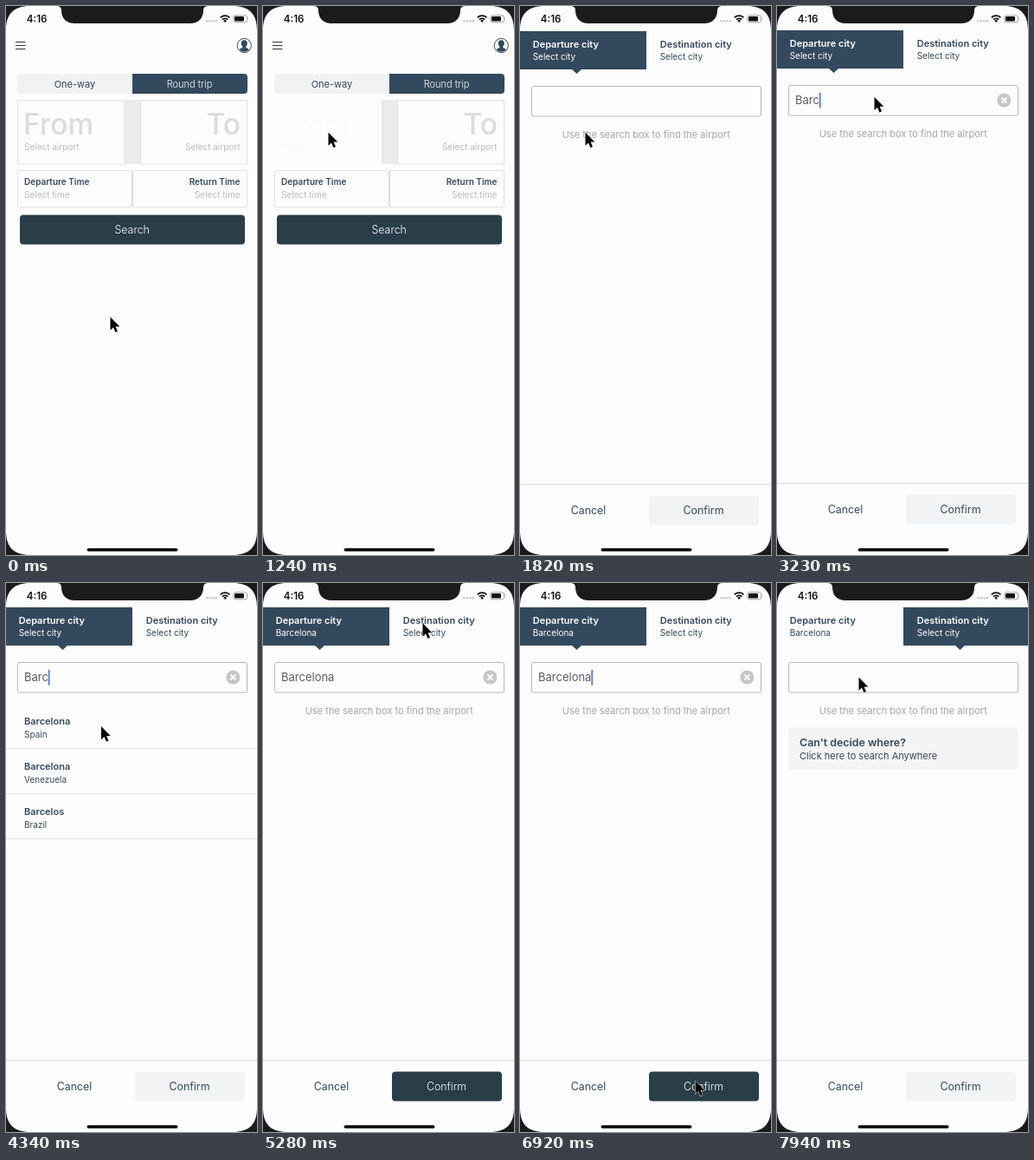
An HTML page for the animation above (8000 ms loop, 290x632 px).

```html
<!DOCTYPE html>
<html lang="en">
<head>
<meta charset="utf-8">
<title>Flight search</title>
<style>
html, body { margin: 0; width: 100%; height: 100%; overflow: hidden; background: #fdfdfd; }
svg { display: block; width: 100vw; height: 100vh; }
text { font-family: Inter, Roboto, sans-serif; font-size: 11px; fill: #34495e; white-space: pre; }
.s10 { font-size: 10px; }
.s12 { font-size: 12.4px; }
.s13 { font-size: 13px; }
.big { font-size: 33.5px; font-weight: 500; fill: #dcdcdc; }
.bold { font-weight: 600; }
.light { font-weight: 300; }
.pale { fill: #bdbdbd; }
.hint { fill: #a6a6a6; }
.white { fill: #fff; }
.end { text-anchor: end; }
.mid { text-anchor: middle; }
.box { fill: #fdfdfd; stroke: #e2e2e2; }
.navy { fill: #33495d; }
.dark { fill: #2a3e49; }
</style>
</head>
<body>
<svg viewBox="0 0 290 632" xmlns="http://www.w3.org/2000/svg">
  <rect width="290" height="632" fill="#fdfdfd"/>

  <g id="home">
    <path d="M11 41.5H22.5M11 45.5H22.5M11 49.5H22.5" stroke="#333" stroke-width="1.1"/>
    <circle cx="275.3" cy="45.5" r="8.1" fill="#fdfdfd" stroke="#33495d"/>
    <path class="navy" d="M275.3 39.3c2.4 0 3.6 1.7 3.5 3.9-.1 1.6-.8 2.7-1.5 3.4v1.4c1.4.6 2.9 1 3.5 2.2a7.3 7.3 0 0 1-11 0c.6-1.2 2.1-1.6 3.5-2.2v-1.4c-.7-.7-1.4-1.8-1.5-3.4-.1-2.2 1.1-3.9 3.5-3.9z"/>
    <path d="M17 78H146V101H17a4 4 0 0 1-4-4V82a4 4 0 0 1 4-4z" fill="#f0f2f3"/>
    <path class="navy" d="M146 78H275a4 4 0 0 1 4 4V97a4 4 0 0 1-4 4H146z"/>
    <text class="mid" x="79.5" y="93.7">One-way</text>
    <text class="mid white light" x="212" y="93.7">Round trip</text>
    <rect x="136" y="108" width="20" height="74" fill="#ebebeb"/>
    <rect x="136" y="109" width="1" height="73" fill="#fdfdfd" id="edge"/>
    <g id="from">
      <rect class="box" x="13.5" y="108.5" width="123" height="73.5"/>
      <rect x="136" y="108" width="2" height="74.5" fill="#ebebeb"/>
      <text class="big" x="20" y="148">From</text>
      <text class="s10 pale" x="21" y="166">Select airport</text>
    </g>
    <rect class="box" x="155.5" y="108.5" width="123" height="73.5"/>
    <text class="big end" x="271" y="148">To</text>
    <text class="s10 pale end" x="270.5" y="166">Select airport</text>
    <rect class="box" x="13.5" y="189.5" width="132" height="42" rx="1.5"/>
    <rect class="box" x="146.5" y="189.5" width="132" height="42" rx="1.5"/>
    <path d="M146 190V231" stroke="#d6d6d6"/>
    <text class="s10 bold" x="21" y="206">Departure Time</text>
    <text class="s10 pale" x="21" y="220.8">Select time</text>
    <text class="s10 bold end" x="270.5" y="206">Return Time</text>
    <text class="s10 pale end" x="270.5" y="220.8">Select time</text>
    <rect class="dark" x="16" y="240.5" width="260" height="34" rx="4"/>
    <text class="s12 mid white light" x="145.7" y="262.3">Search</text>
  </g>

  <g id="modal">
    <rect y="28" width="290" height="604" fill="#fdfdfd"/>
    <g id="tab" class="navy"><path d="M0 28H146V72H71L65.5 77L60 72H0z"/></g>
    <text id="depTitle" class="bold" x="14.7" y="46.7">Departure city</text>
    <text id="depCity" class="s10" x="14.7" y="61.2"></text>
    <text id="desTitle" class="bold" x="161.7" y="46.7">Destination city</text>
    <text id="desCity" class="s10" x="161.7" y="61.2">Select city</text>
    <rect x="13.5" y="91.5" width="265" height="34.5" rx="2" fill="#fdfdfd" stroke="#b8b8b8"/>
    <text id="query" class="s13" x="21" y="113.2" style="fill:#5c5c5c"></text>
    <rect id="caret" y="100" width="1.6" height="17.5" fill="#4a6ee0"/>
    <g id="clear">
      <circle cx="262.4" cy="108.5" r="8" fill="#c6c6c6"/>
      <path d="M259.4 105.5l6 6m0-6l-6 6" stroke="#fff" stroke-width="1.9"/>
    </g>
    <text id="hint" class="mid hint" x="145.8" y="151">Use the search box to find the airport</text>
    <g id="results"></g>
    <g id="card">
      <rect x="13" y="166" width="266" height="49" rx="5" fill="#f4f4f4"/>
      <text class="bold s12" x="26" y="188.4">Can't decide where?</text>
      <text x="26" y="203">Click here to search Anywhere</text>
    </g>
    <path d="M0 549.5H290" stroke="#dadada"/>
    <text class="s12 mid" x="79" y="584">Cancel</text>
    <g id="confirm">
      <rect id="button" x="149" y="562.5" width="127" height="34" rx="4"/>
      <text id="label" class="s12 mid" x="212" y="584">Confirm</text>
    </g>
  </g>

  <g id="device">
    <path fill="#1b1b1c" fill-rule="evenodd" d="M0 0H290V632H0z M28 0C9 0 0 9 0 28V604C0 623 9 632 28 632H262C281 632 290 623 290 604V28C290 9 281 0 262 0z"/>
    <path fill="#1b1b1c" d="M58 0Q64 0 64 5C64 14.500 70 20 79 20H213C222 20 228 14.500 228 5Q228 0 234 0z"/>
    <text class="bold" x="23.800" y="18.800" style="font-size:11.600px;fill:#111">4:16</text>
    <g fill="#c9c9cb">
      <circle cx="232.500" cy="17.300" r="1.300"/><circle cx="235.900" cy="17.300" r="1.300"/>
      <circle cx="239.300" cy="17.300" r="1.300"/><circle cx="242.700" cy="17.300" r="1.300"/>
    </g>
    <g fill="none" stroke="#111" stroke-width="1.700">
      <path d="M247.800 13.400a7.400 7.400 0 0 1 10.600 0M249.900 15.700a4.500 4.500 0 0 1 6.400 0"/>
    </g>
    <path d="M251.200 17a2.700 2.700 0 0 1 3.800 0l-1.900 2z" fill="#111"/>
    <rect x="262.800" y="10.800" width="15.800" height="8" rx="2.300" fill="none" stroke="#8b8b8b" stroke-width=".8"/>
    <rect x="264" y="12" width="11" height="5.600" rx="1.300" fill="#111"/>
    <path d="M279.600 13.400q1.200 1.400 0 2.800z" fill="#8b8b8b"/>
    <rect x="93.500" y="624.300" width="105" height="3.500" rx="1.750" fill="#050505"/>
  </g>

  <path id="cursor" d="M0 0V15.200L3.500 12L5.900 17.600L8.500 16.500L6.100 11H10.800z" fill="#050505" stroke="#fff" stroke-width="1" paint-order="stroke"/>
</svg>
<script>
const LOOP = 8000;
const el = {};
document.querySelectorAll("[id]").forEach(n => el[n.id] = n);

const OPEN = 1400, SELECT = 4580, PRESS = 6970, NEXT = 7200;
const clamp = v => Math.min(1, Math.max(0, v));
const ramp = (t, a, b) => clamp((t - a) / (b - a));
const ease = p => p * p * (3 - 2 * p);
const within = (t, a, b) => t >= a && t < b;
const fade = (node, v) => node.setAttribute("opacity", v);
const move = (node, x, y) => node.setAttribute("transform", `translate(${x} ${y})`);

const rows = [["Barcelona", "Spain"], ["Barcelona", "Venezuela"], ["Barcelos", "Brazil"]];
el.results.innerHTML = `<rect y="139" width="290" height="156" fill="#fdfdfd"/>` +
  rows.map(([city, country], i) => {
    const y = 139 + i * 52;
    return `<rect ${i ? "" : 'id="row"'} y="${y}" width="290" height="51" fill="#fdfdfd"/>
      <text class="bold" x="21" y="${y + 24}">${city}</text>
      <text class="s10" x="21" y="${y + 39}">${country}</text>
      <path d="M0 ${y + 51.5}H290" stroke="#e2e2e2"/>`;
  }).join("");
el.row = document.getElementById("row");

// time, x, y
const path = [
  [0, 120.5, 358], [870, 120.5, 358], [1060, 75.5, 145.5], [1850, 75.5, 145.5],
  [2010, 106, 109], [2110, 112, 106], [2220, 112, 106], [2340, 112.5, 104.8],
  [3760, 112.5, 104.8], [4100, 109, 158], [4280, 110, 165], [4970, 110, 165],
  [5280, 184, 46.5], [5380, 232, 33.5], [5460, 251, 80], [5680, 211, 520],
  [5790, 203, 572], [6000, 203, 572], [6090, 227, 608], [6150, 234.5, 613.5],
  [6260, 204, 573], [6800, 204, 573], [6920, 202.5, 573], [7080, 202.5, 573],
  [7400, 142, 320], [7590, 118.5, 209], [7790, 118.5, 209], [7940, 94.5, 108.5], [LOOP, 94.5, 108.5]
];

function cursorAt(t) {
  const i = path.findIndex(p => p[0] > t);
  const [t0, x0, y0] = path[i - 1], [t1, x1, y1] = path[i];
  const p = (t - t0) / (t1 - t0);
  return [x0 + (x1 - x0) * p, y0 + (y1 - y0) * p];
}

function queryAt(t) {
  if (t < 2760 || t >= NEXT) return "";
  if (t >= SELECT) return "Barcelona";
  return "Barc".slice(0, t < 2820 ? 1 : t < 3050 ? 2 : t < 3230 ? 3 : 4);
}

function caretAt(t) {
  if (t < 2220 || t >= NEXT) return 0;
  if (t < SELECT) return ramp(t, 2200, 2280);
  const on = (a, b) => ramp(t, a, a + 60) * (1 - ramp(t, b, b + 60));
  return Math.max(on(4500, 4970), on(5540, 6010), on(6560, 7030));
}

function draw(t) {
  fade(el.from, within(t, 1240, OPEN) ? 0.05 : 0.05 + 0.95 * (t < 1240 ? 1 : ramp(t, OPEN, 1580)));
  el.home.style.display = t > 2110 ? "none" : "";

  const open = ramp(t, OPEN, OPEN + 600);
  move(el.modal, 0, Math.round(20 * Math.pow(1 - open, 2.5)));
  fade(el.modal, t < OPEN ? 0 : 1 - Math.pow(1 - ramp(t, OPEN - 40, OPEN + 300), 2));

  const slide = ease(ramp(t, NEXT, NEXT + 260));
  move(el.tab, 146 * slide, 0);
  const right = slide > 0.5;
  el.depTitle.style.fill = el.depCity.style.fill = right ? "" : "#fff";
  el.desTitle.style.fill = el.desCity.style.fill = right ? "#fff" : "";
  el.depCity.textContent = t < SELECT ? "Select city" : "Barcelona";

  const query = queryAt(t);
  el.query.textContent = query;
  el.caret.setAttribute("x", 21 + (query ? el.query.getComputedTextLength() : 0));
  fade(el.caret, caretAt(t));
  fade(el.clear, query ? 1 : 0);

  const listed = within(t, 3770, SELECT);
  fade(el.results, listed ? ramp(t, 3740, 3940) : 0);
  el.row.setAttribute("fill", within(t, 4400, SELECT) ? "#eeeeee" : "#fdfdfd");
  fade(el.card, ramp(t, NEXT, NEXT + 260));

  const ready = within(t, SELECT, NEXT);
  el.button.setAttribute("fill", ready ? "#2a3e49" : "#f1f3f4");
  el.label.style.fill = ready ? "#fff" : "";
  el.label.style.fontWeight = ready ? 300 : 400;
  const press = ramp(t, PRESS, PRESS + 100) * (1 - ramp(t, NEXT - 60, NEXT + 100));
  fade(el.confirm, 1 - 0.75 * press);

  move(el.cursor, ...cursorAt(t));
}

const start = performance.now();
function tick() {
  draw((performance.now() - start) % LOOP);
  requestAnimationFrame(tick);
}
tick();
</script>
</body>
</html>
```
